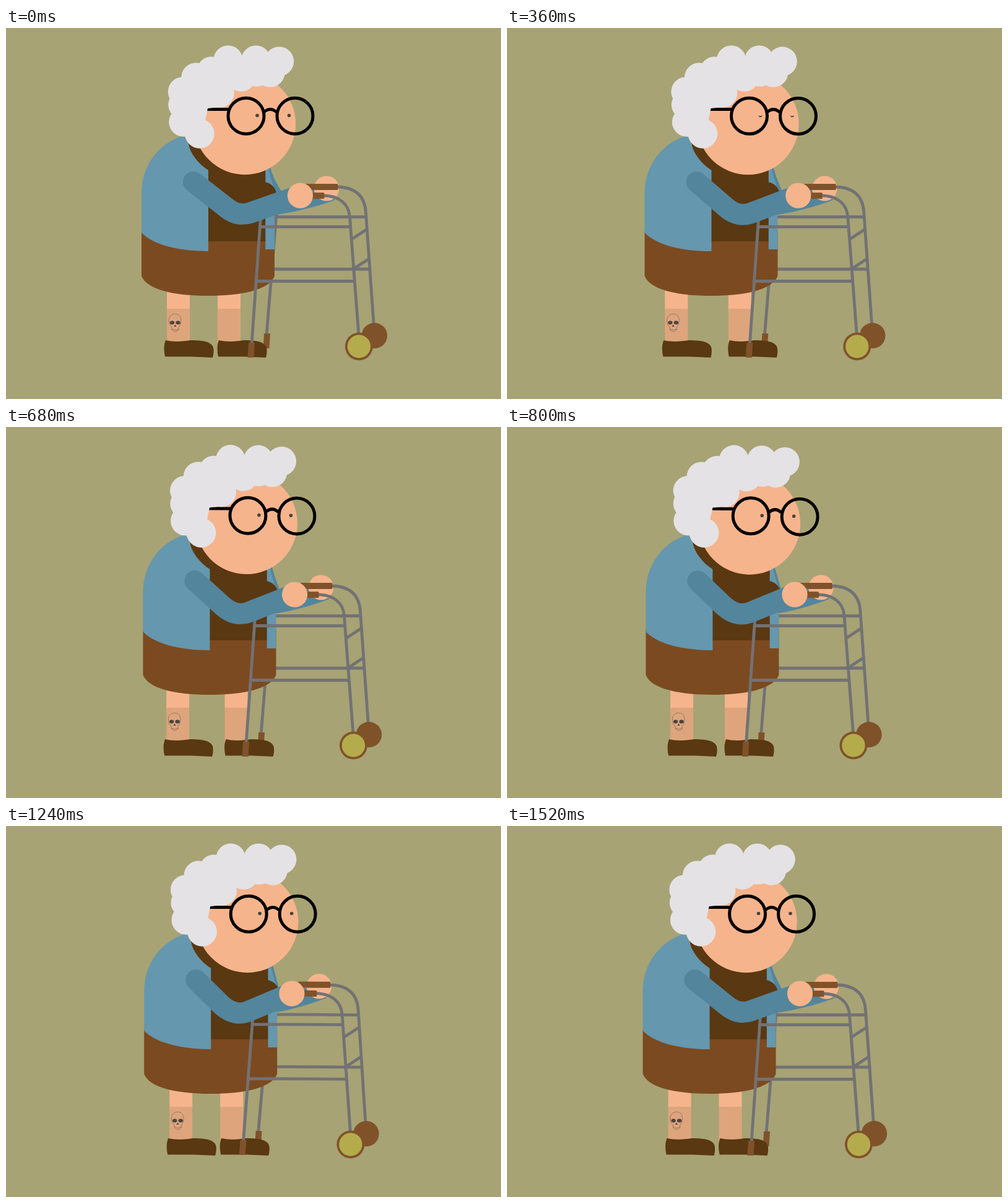
These frames come from a looping animation (800x600 px, 1560 ms). An HTML page:

```html
<!DOCTYPE html>
<html lang="en">
<head>
<meta charset="utf-8">
<title>Granny with walker</title>
<style>
  html, body { margin: 0; width: 100%; height: 100%; overflow: hidden; background: #a7a374; }
  svg { display: block; width: 100vw; height: 100vh; }
  .skin { fill: #f6b48c; }
  .stocking { fill: #dea57d; }
  .dark { fill: #5a3811; }
  .skirt { fill: #7c4a20; }
  .jacket { fill: #6597ae; }
  .sleeve { fill: #53859c; }
  .wood { fill: #80522a; }
  .hair { fill: #e4e2e5; }
  .curls { stroke: #e4e2e5; stroke-width: 47.5; stroke-linecap: round; }
  .tube { fill: none; stroke: #727275; stroke-width: 4.8; }
  .specs { fill: none; stroke: #000; stroke-width: 5; }
  .eye { fill: #45453e; }
  .ink { fill: none; stroke: #7a6350; stroke-width: .7; }
  .inkfill { fill: #4d4540; }
</style>
</head>
<body>
<svg viewBox="0 0 800 600">
  <defs>
    <path id="shoe" class="dark" d="M258 505C270 508 287 507 298 505C318 505 335 507 335.500 520Q336 527 334 533L300 531.500H257Q253.500 515 258 505Z"/>
    <g id="leg">
      <path class="skin" d="M260 420H297V456H260Z"/>
      <path class="stocking" d="M260 454H297V510H260Z"/>
    </g>
    <g id="eye">
      <circle class="eye" cy="141.500" r="2.800"/>
      <circle class="lid skin" cy="134" r="3.600"/>
    </g>
    <circle id="lens" class="specs" cy="142.300" r="29"/>
  </defs>

  <path id="farArm" class="sleeve"/>
  <g id="farWalker">
    <circle class="skin" cx="518" cy="259.500" r="20.300"/>
    <path class="tube" d="M534 257C565 257 580 272 581.500 298L594.500 482M437 300L421 498M436 305.500H582M430 390H587M558 342L584 325M561 390L587 373"/>
    <rect class="wood" x="484" y="252" width="52.500" height="10" rx="1.500"/>
    <path class="wood" d="M417 494H427L425.500 518H416Z"/>
    <circle class="wood" cx="595.500" cy="497.500" r="20.700"/>
  </g>

  <g id="rightLeg">
    <use href="#leg" x="82"/>
    <use href="#shoe" x="86"/>
  </g>
  <g id="leftLeg">
    <use href="#leg"/>
    <path class="ink" d="M264 479C261 467 267 462.500 273.500 462.500S285 467 282 479L279 484V488Q273.500 494 268 488V484ZM268 487Q273.500 490 279 487"/>
    <g class="inkfill">
      <ellipse cx="268.500" cy="476.500" rx="3.700" ry="3"/>
      <ellipse cx="278" cy="476.500" rx="3.700" ry="3"/>
      <path d="M273.300 479.500L275.300 483H271.300Z"/>
    </g>
    <use href="#shoe"/>
  </g>

  <g id="torso">
    <path class="skirt" d="M219 328H434V401C425 424 380 433 327 433S228 424 219 401Z"/>
    <path class="dark" d="M294 182L330 190H420V345H326V240L300 215Z"/>
    <path class="jacket" d="M419.300 226H424C427 243 433 254 434 268V358H419.300Z"/>
    <path class="dark" d="M418 249C426 250 434 256 436.500 265V280H418Z"/>
    <path class="jacket" d="M287 174C247 186 219 222 219 268V331C240 353 285 361 327 361V230C310 219 298 203 294 186Z"/>
  </g>

  <g id="head">
    <circle class="skin" cx="386" cy="155" r="82.200"/>
    <path class="specs" d="M324 131.500H361M417 136Q427 127 437 136"/>
    <use href="#eye" x="406"/>
    <use href="#eye" x="457.500"/>
    <use href="#lens" x="388"/>
    <use href="#lens" x="467"/>
    <path class="hair" d="M285 110L320 70L400 55L430 70L380 85L345 128L326 130L320 160L290 150Z"/>
    <path class="curls" d="M313 171h0M287 152h0M286 124h0M285.500 103h0M307 80h0M332 70h0M359 52h0M404 52h0M441.500 54h0M427 72h0M405 71h0M380 79h0M345 105h0"/>
  </g>

  <g id="nearWalker">
    <path class="tube" d="M413 285L397 512M512 271C539 271 554 285 555.500 305L570 496M411 321.500H557M404 409.500H563"/>
    <path class="wood" d="M392 509H402L400.500 533H390.500Z"/>
    <circle class="wood" cx="570.500" cy="515" r="22.500"/>
    <circle cx="570.500" cy="515" r="18.700" fill="#b4ab4d"/>
    <rect class="wood" x="484" y="266.300" width="30.500" height="10" rx="1.500"/>
  </g>
  <path id="nearArm" fill="none" stroke="#53859c" stroke-width="34" stroke-linecap="round"/>
  <circle id="nearHand" class="skin" cx="475.500" cy="271" r="20.600"/>
</svg>

<script>
const LOOP = 1560, TICK = 40;
const STRIDE = 20.5; // ground covered per loop

const $ = id => document.getElementById(id);
const lids = document.querySelectorAll(".lid");

const phase = (t, start, end) => Math.min(1, Math.max(0, (t - start) / (end - start)));
const smooth = p => p * p * (3 - 2 * p);
const bump = (t, start, end) => Math.sin(Math.PI * phase(t, start, end)) ** 2;
const step = (t, start, end) => STRIDE * smooth(phase(t, start, end));

const move = (id, x, extra = "") => $(id).setAttribute("transform", `translate(${x} 0) ${extra}`);

function draw(t) {
  // everything drifts back with the ground and catches up in its own step
  const drift = -STRIDE * t / LOOP;
  const body = drift + .4 * step(t, 0, 320) + .6 * step(t, 520, 1000);
  const walker = drift + STRIDE * phase(t, 1160, LOOP) ** 1.25;
  const nod = 1.15 * (bump(t, 0, 380) + bump(t, 600, 920));
  const tilt = `rotate(${.35 * bump(t, 1100, 1400)} 570 515)`;

  move("torso", body);
  move("head", body, `rotate(${nod} 300 190)`);
  move("leftLeg", drift + step(t, 440, 1000));
  move("rightLeg", drift + step(t, 0, 370));
  move("farWalker", walker, tilt);
  move("nearWalker", walker, tilt);
  move("nearHand", walker);

  const blink = bump(t, 280, 480);
  lids.forEach(lid => lid.setAttribute("cy", 134 + 5.2 * blink));

  // the elbow sits halfway and drops as the arm folds
  const x = n => n + (body + walker) / 2, y = n => n + (body - walker) * .09;
  const b = n => n + body, w = n => n + walker;
  $("nearArm").setAttribute("d",
    `M${b(303)} 249L${x(353)} ${y(288)}Q${x(373)} ${y(306)} ${x(394)} ${y(299)}L${w(470)} 272.5`);
  $("farArm").setAttribute("d",
    `M${b(422)} 226H${b(427)}Q${b(433)} 246 ${x(446)} 265L${w(500)} 262L${w(532)} 278Q${w(490)} 294 ${x(438)} 302L${b(420)} 303Z`);
}

function frame(now) {
  draw(Math.floor(now % LOOP / TICK) * TICK);
  requestAnimationFrame(frame);
}
draw(0);
requestAnimationFrame(frame);
</script>
</body>
</html>
```
